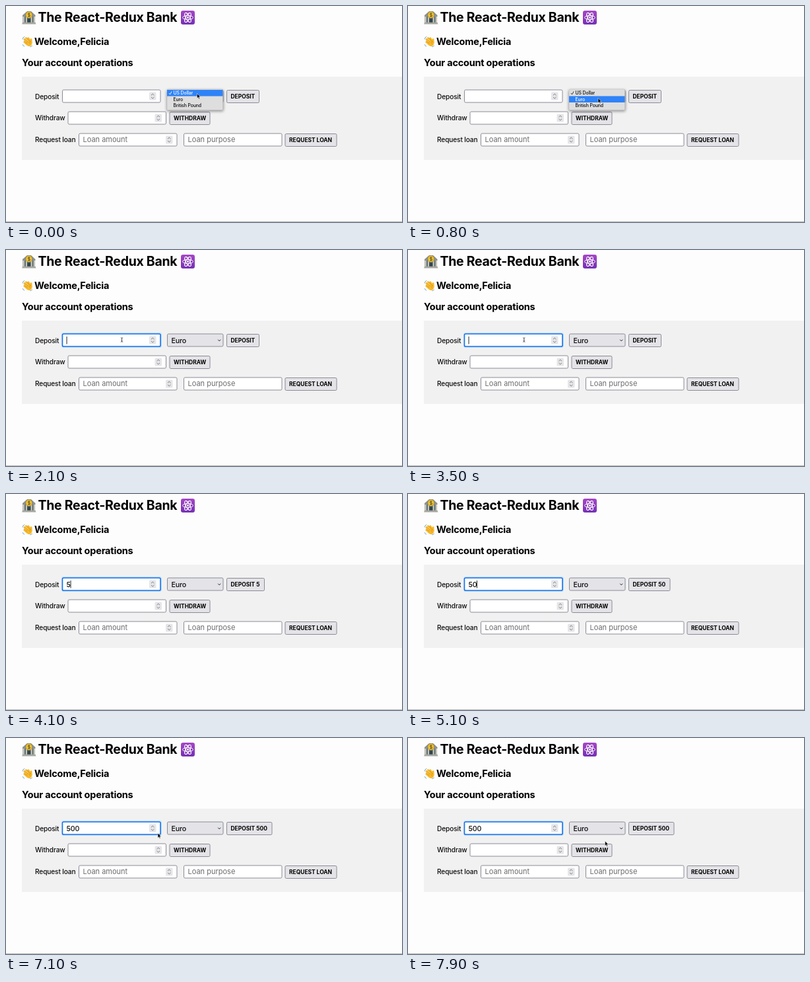
An HTML page for the animation above (8 s loop, 600 by 327 pixels).

```html
<!DOCTYPE html>
<html lang="en">
<head>
<meta charset="utf-8">
<title>Bank</title>
<style>
  html, body { margin: 0; width: 100%; height: 100%; overflow: hidden; background: #fdfdfd; }
  svg { display: block; width: 100vw; height: 100vh; }
  text { font-family: Inter, sans-serif; fill: #0c0c0e; letter-spacing: -.015em; white-space: pre; }
  .h { font-weight: 700; fill: #000; font-size: 14.5px; }
  .h1 { font-size: 19.5px; }
  .label { font-size: 10.2px; font-weight: 450; }
  .value { font-size: 10.7px; font-weight: 450; }
  .hint { font-size: 11px; fill: #6c6c70; letter-spacing: 0; }
  .btn { font-size: 8.45px; font-weight: 700; letter-spacing: 0; fill: #000; }
  .item { font-size: 6.9px; font-weight: 500; }
  .field { fill: #fff; stroke: #8a8a98; }
  .button { fill: #e4e4e8; stroke: #8a8a98; }
</style>
</head>
<body>
<svg viewBox="0 0 600 327" preserveAspectRatio="none">
  <defs>
    <filter id="soft" x="-10%" y="-20%" width="120%" height="150%"><feGaussianBlur stdDeviation="2"/></filter>
    <linearGradient id="violet" x2="0" y2="1"><stop stop-color="#a647c6"/><stop offset="1" stop-color="#7430b4"/></linearGradient>
  </defs>
  <rect width="600" height="327" fill="#fdfdfd"/>
  <rect y="326" width="600" height="1" fill="#b9b9b9"/>
  <rect x="24" y="107" width="576" height="126" fill="#f1f1f1"/>

  <g id="bank">
    <path d="M25 14 32 8H38L44.500 14V16H25Z" fill="#8d918b"/>
    <path d="M25.500 16H44V25H25.500Z" fill="#4d6068"/>
    <path d="M25.500 16h2.600v9h-2.600ZM29.800 16h2.300v9h-2.300ZM37.500 16h2.300v9h-2.300ZM41.500 16h2.600v9h-2.600Z" fill="#c6c4b6"/>
    <path d="M32.500 19.500h4.600V25h-4.600Z" fill="#2f4450"/>
    <path d="M25 24.800h19.600l.8 2.700H24.200Z" fill="#a5a79f"/>
    <circle cx="34.800" cy="13.500" r="4.900" fill="#f0c53a" stroke="#8b7328" stroke-width=".6"/>
    <path d="M36.600 11.800c-.6-1-3.400-.9-3.400.5s3.600.8 3.600 2.400-3 1.600-3.800.3M34.900 10.200v6.600" fill="none" stroke="#5e5120" stroke-width=".9"/>
  </g>
  <g id="wave" fill="none" stroke-linecap="round">
    <path d="M27.800 50.500l5 5M30.300 48.500l5 5.500M33.700 48.500l3.300 4.500M27.700 54.500l4 3.500M38.200 50.500l.2 5" stroke="#f6b92c" stroke-width="2.600"/>
    <path d="M29.500 55 36 51.500l3.500 3c.5 4-2 7-5.200 6.500-1.900-.4-3.400-2-4.800-4Z" fill="#f6b92c"/>
    <path d="M28.700 49.700l5 5.300M31.700 48.300l4.600 5.200M27.500 52.900l4.500 4M37.300 53q-2 2-1.200 4.300" stroke="#c98220" stroke-width=".6"/>
    <path d="M25 50q.4-2.700 3-3.600M39.600 60q-1 1.600-2.800 1.800M25.300 58.500q.6 2 2.400 2.600" stroke="#5b8fb5" stroke-width=".8"/>
  </g>
  <g id="atom" fill="none" stroke="#fff">
    <rect x="265" y="7" width="21" height="21" rx="3.200" fill="url(#violet)" stroke="none"/>
    <ellipse cx="275.500" cy="17.500" rx="8" ry="3"/>
    <ellipse cx="275.500" cy="17.500" rx="8" ry="3" transform="rotate(60 275.500 17.500)"/>
    <ellipse cx="275.500" cy="17.500" rx="8" ry="3" transform="rotate(120 275.500 17.500)"/>
    <circle cx="275.500" cy="17.500" r="1.400" fill="#fff" stroke="none"/>
  </g>

  <text class="h h1" x="48.500" y="24.300">The React-Redux Bank</text>
  <text class="h" x="43" y="59">Welcome,Felicia</text>
  <text class="h" x="24" y="91">Your account operations</text>

  <g id="form"></g>

  <g id="popup">
    <rect x="243.500" y="127.500" width="86" height="32" rx="2" fill="#000" opacity=".4" filter="url(#soft)"/>
    <rect x="244" y="126" width="84.500" height="31.500" rx="1.500" fill="#dededf" stroke="#bdbdbd" stroke-width=".5"/>
    <rect id="bar" x="244" width="84.500" height="9.600" fill="#2f83f7"/>
    <path id="tick" d="M247 132l1.500 1.900 2.700-4.500" fill="none" stroke-width=".9"/>
    <text class="item" x="253.500" y="134.200">US Dollar</text>
    <text class="item" x="253.500" y="143.800">Euro</text>
    <text class="item" x="253.500" y="153.400">British Pound</text>
  </g>

  <path id="arrow" d="M0 0V7.200L1.700 5.700 2.800 8.200 4 7.700 2.900 5.200H5.100Z" fill="#000" stroke="#fff" stroke-width=".5"/>
  <path id="beam" d="M-1.600-3.200Q0-3.200 0-2.200 0-3.200 1.600-3.200M0-2.500V2.500M-1.600 3.200Q0 3.200 0 2.200 0 3.200 1.600 3.200M-.8.9H.8" fill="none" stroke="#333" stroke-width=".8"/>
</svg>
<script>
const LOOP = 8000;
const $ = id => document.getElementById(id);
const set = (el, attrs) => { for (const k in attrs) el.setAttribute(k, attrs[k]); return el; };
const show = (el, on) => set(el, { visibility: on ? 'visible' : 'hidden' });

function add(tag, attrs, text = '') {
  const el = set(document.createElementNS('http://www.w3.org/2000/svg', tag), attrs);
  el.textContent = text;
  return $('form').appendChild(el);
}
const label = (cls, x, y, text) => add('text', { class: cls, x, y }, text);
const box = (cls, x, y, width, height = 19) =>
  add('rect', { class: cls, x: x + .5, y: y + .5, width: width - 1, height, rx: 1.8 });

function field(x, y, hint, spin = true) {
  const el = box('field', x, y, 149.5);
  if (hint) label('hint', x + 6.5, y + 13.7, hint);
  if (spin) {
    add('rect', { x: x + 132, y: y + 4, width: 10.5, height: 12, rx: 1.5, fill: '#e6e6e9' });
    add('path', { d: `M${x + 135} ${y + 8.7}l2.25-2.2 2.25 2.2m0 2.7l-2.25 2.2-2.25-2.2`, fill: 'none', stroke: '#5f5f66', 'stroke-width': .8 });
  }
  return el;
}
function button(x, y, width, text) {
  return { rect: box('button', x, y, width), text: label('btn', x + 6.5, y + 13.2, text) };
}

label('label', 44, 140.5, 'Deposit');
label('label', 44, 173.3, 'Withdraw');
label('label', 44, 206.1, 'Request loan');
const ring = add('rect', { x: 84, y: 125, width: 152, height: 23, rx: 3.5, fill: '#c3ddfc' });
const amountBox = field(85, 126.5);
const amount = label('value', 91.5, 140.6, '');
const caret = add('rect', { y: 131, width: .9, height: 11.5, fill: '#111' });
box('button', 244, 126.5, 85.5);
const currency = label('value', 250.5, 140.6, 'Euro');
add('path', { d: 'M321.2 135.7l2 2.1 2-2.1', fill: 'none', stroke: '#222' });
const deposit = button(334, 127, 50, 'DEPOSIT');
field(93.5, 159.5);
button(247.5, 160, 62, 'WITHDRAW');
field(110, 192.5, 'Loan amount');
field(269, 192.5, 'Loan purpose', false);
button(422.5, 193, 79, 'REQUEST LOAN');

// [time, typed text, caret x, button width]
const typing = [[0, '', 92, 50], [3700, '5', 98, 58], [4200, '50', 104.5, 63.5], [5200, '500', 110.7, 69.5]];
const FOCUS = 2000, FIRST_KEY = 3700;
const blinks = [2500, 3000, 3600, 3700, 4800, 5000, 5700, 6200, 6700, 7200, 7700];

// [time, x, y]
const path = [
  [0, 289.5, 132.5], [100, 289.5, 132.5], [400, 288, 139.5], [1000, 288, 139.5],
  [1400, 219, 125.5], [1800, 175.5, 136], [6300, 176.5, 136], [6700, 230, 144],
  [7300, 230, 144], [7800, 285, 151.5], [7900, 298.5, 156]
];

function pointer(t) {
  const i = path.findIndex(p => p[0] > t);
  if (i < 0) return path[path.length - 1].slice(1);
  const [a, b] = [path[i - 1], path[i]];
  const u = (t - a[0]) / (b[0] - a[0]), k = u * u * (3 - 2 * u);
  return [a[1] + (b[1] - a[1]) * k, a[2] + (b[2] - a[2]) * k];
}

function draw(t) {
  const euro = t >= 250, flash = t >= 600 && t < 700;
  set($('popup'), { opacity: Math.max(0, Math.min(1, (1200 - t) / 200)) });
  set($('bar'), { y: euro ? 136.4 : 126.9 });
  show($('bar'), !flash);
  set($('tick'), { stroke: euro ? '#222' : '#fff' });
  document.querySelectorAll('.item').forEach((el, i) => {
    el.style.fill = !flash && i === +euro ? '#fff' : '#0c0c0e';
  });
  currency.textContent = t < 1000 ? 'US Dollar' : 'Euro';

  const [, text, caretX, width] = typing.filter(s => s[0] <= t).pop();
  const focused = t >= FOCUS;
  amount.textContent = text;
  deposit.text.textContent = text ? 'DEPOSIT ' + text : 'DEPOSIT';
  set(deposit.rect, { width: width - 1 });
  set(caret, { x: caretX - .4 });
  show(caret, focused && blinks.filter(b => b <= t).length % 2 === 0);
  show(ring, focused);

  const [x, y] = pointer(t);
  const inside = x > 85 && x < 234 && y > 125 && y < 147;
  amountBox.style.stroke = focused ? '#1673e6' : inside ? '#62626d' : '';
  amountBox.style.strokeWidth = focused ? 1.6 : 1;

  const hidden = t >= FIRST_KEY && t < 6100;
  const overText = inside && x < 215;
  const place = { transform: `translate(${x} ${y})` };
  show(set($('beam'), place), overText && !hidden);
  show(set($('arrow'), place), !overText && !hidden);
}

function tick(now) {
  draw(now % LOOP);
  requestAnimationFrame(tick);
}
draw(0);
requestAnimationFrame(tick);
</script>
</body>
</html>
```
